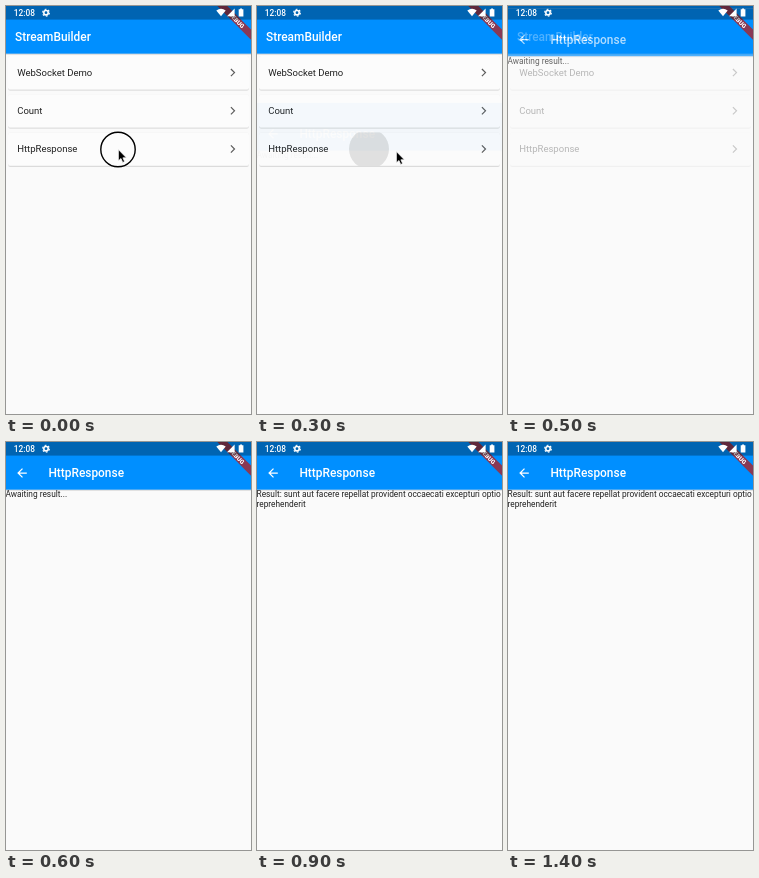
An HTML page for the animation above (2200 ms loop, 245 by 408 pixels).

```html
<!DOCTYPE html>
<html lang="en">
<head>
<meta charset="utf-8">
<title>StreamBuilder</title>
<style>
  html, body { margin: 0; width: 100%; height: 100%; overflow: hidden; background: #fafafa; }
  svg { display: block; width: 100vw; height: 100vh; font-family: Roboto, sans-serif; }
  .title { font-size: 11.9px; font-weight: 500; fill: #fff; }
  .item { font-size: 9.53px; fill: #212121; }
  .body { font-size: 8.34px; fill: #212121; }
</style>
</head>
<body>
<svg viewBox="0 0 245 408">
  <defs>
    <filter id="shade" x="-5%" y="-20%" width="110%" height="150%">
      <feDropShadow dx="0" dy="0.6" stdDeviation="0.6" flood-color="#000" flood-opacity="0.28"/>
    </filter>
    <clipPath id="card3"><rect x="2" y="126.4" width="241" height="33.4" rx="2"/></clipPath>
  </defs>

  <rect width="245" height="408" fill="#fafafa"/>
  <g id="list"></g>
  <g clip-path="url(#card3)"><circle id="ripple" cx="112" cy="143"/></g>
  <rect width="245" height="47.6" fill="#008fff" filter="url(#shade)"/>
  <text class="title" x="9" y="35.2">StreamBuilder</text>

  <g id="page">
    <rect width="245" height="408" fill="#fafafa"/>
    <text class="body" x="-0.5" y="55.2" id="line1"></text>
    <text class="body" x="-0.5" y="65" id="line2"></text>
    <rect width="245" height="47.6" fill="#008fff" filter="url(#shade)"/>
    <path d="M20.8 31H12.4M16.5 26.6L12.1 31L16.5 35.4" fill="none" stroke="#fff" stroke-width="1.25"/>
    <text class="title" x="42.4" y="35.2">HttpResponse</text>
  </g>

  <g transform="translate(245 0) rotate(45)">
    <rect x="-23.8" y="16.7" width="47.6" height="7.1" fill="#b71c1c" fill-opacity="0.75"/>
    <text y="22.4" text-anchor="middle" font-size="6" font-weight="900" fill="#fff">DEBUG</text>
  </g>

  <rect width="245" height="13.6" fill="#000" fill-opacity="0.3"/>
  <g fill="#fff">
    <text x="7.8" y="9.9" font-size="8.34" font-weight="500">12:08</text>
    <circle cx="40" cy="6.7" r="2.2" fill="none" stroke="#fff" stroke-width="1.6"/>
    <circle cx="40" cy="6.7" r="3.4" fill="none" stroke="#fff" stroke-width="1.1" stroke-dasharray="1.78 1.78"/>
    <path d="M215 10.2L210.3 4.4Q215 1 219.7 4.4Z"/>
    <path d="M221 10.2H228.6V2.6Z"/>
    <path d="M232.7 3.2H234.1V2.4H236V3.2H237.4V10.4H232.7Z"/>
  </g>

  <circle id="ring" cx="112" cy="143.5" r="17.2" fill="none" stroke="#000" stroke-width="1.4"/>
  <path id="cursor" d="M0 0V11.2L2.6 8.9L4.3 12.8L6.2 12L4.5 8.2H8Z" fill="#000" stroke="#fff" stroke-width="0.7"/>
</svg>
<script>
const LOOP = 2200, STEP = 100;
const PUSH_AT = 260, PUSH_TIME = 300, RISE = 102;
const $ = id => document.getElementById(id);

$('list').innerHTML = ['WebSocket Demo', 'Count', 'HttpResponse'].map((label, i) => `
  <g transform="translate(0 ${50 + i * 38.2})">
    <rect x="2" width="241" height="33.4" rx="2" fill="#fcfcfc" filter="url(#shade)"/>
    <text class="item" x="11.2" y="19.8">${label}</text>
    <path d="M224.9 13L228.5 16.6L224.9 20.2" fill="none" stroke="#5c5c5c" stroke-width="1.2"/>
  </g>`).join('');

const clamp = x => Math.min(1, Math.max(0, x));

// CSS-style cubic bezier, solved by bisection
function bezier(x1, y1, x2, y2) {
  const at = (a, b, s) => 3 * a * s * (1 - s) ** 2 + 3 * b * s * s * (1 - s) + s ** 3;
  return x => {
    if (x <= 0 || x >= 1) return clamp(x);
    let lo = 0, hi = 1;
    for (let i = 0; i < 24; i++) {
      const mid = (lo + hi) / 2;
      if (at(x1, x2, mid) < x) lo = mid; else hi = mid;
    }
    return at(y1, y2, lo);
  };
}
const fastOutSlowIn = bezier(0.4, 0, 0.2, 1);
const easeIn = bezier(0.42, 0, 1, 1);

function show(el, on) { el.setAttribute('visibility', on ? 'visible' : 'hidden'); }

function draw(ms) {
  const t = Math.floor(ms / STEP) * STEP;

  show($('ring'), t < 100);
  show($('cursor'), t < 400);
  const move = clamp((t - 100) / 200);
  $('cursor').setAttribute('transform', `translate(${112.4 + 27 * move} ${143.6 + 2 * move})`);

  // slow growth while pressed, then a quick spread that fades
  const spread = clamp((t - 300) / 100);
  $('ripple').setAttribute('r', Math.min(t, 300) / 15 + 62 * spread);
  $('ripple').setAttribute('fill-opacity', t < 500 ? 0.11 - 0.1 * spread : 0);

  const push = clamp((t - PUSH_AT) / PUSH_TIME);
  $('page').setAttribute('transform', `translate(0 ${RISE * (1 - fastOutSlowIn(push))})`);
  $('page').setAttribute('opacity', easeIn(push));

  const done = t >= 700;
  $('line1').textContent = done
    ? 'Result: sunt aut facere repellat provident occaecati excepturi optio'
    : 'Awaiting result...';
  $('line2').textContent = done ? 'reprehenderit' : '';
}

const start = performance.now();
function tick() {
  draw((performance.now() - start) % LOOP);
  requestAnimationFrame(tick);
}
tick();
</script>
</body>
</html>
```
